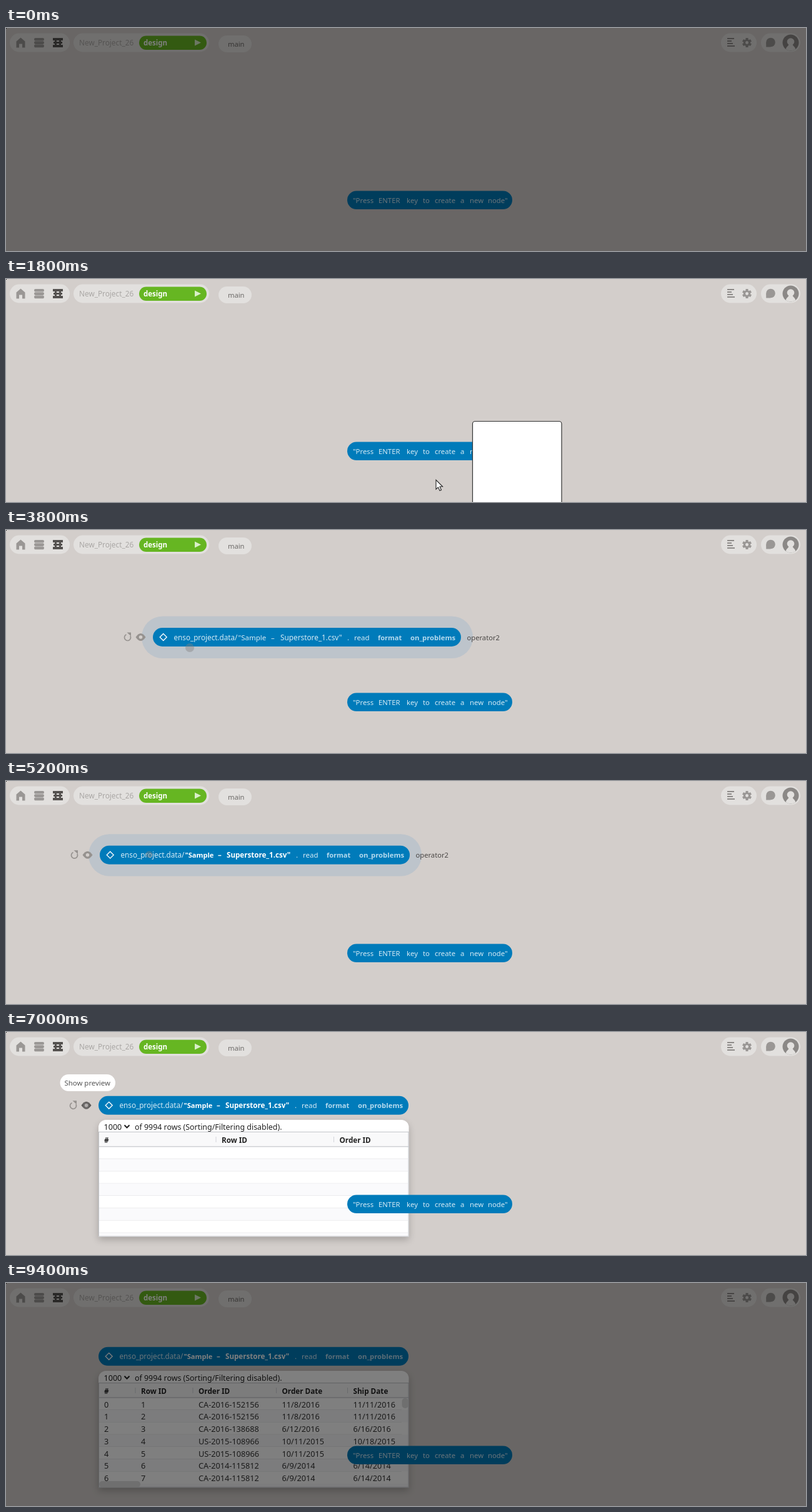
Recreate the animation shown at these times as an HTML page with a canvas. Size 1280 px wide and 358 px high, loop 9.6 s.

```html
<!DOCTYPE html>
<html lang="en">
<head>
<meta charset="utf-8">
<title>Node editor: file drop and preview</title>
<style>
html, body { margin: 0; width: 100%; height: 100%; overflow: hidden; background: #d3cecb; }
canvas { display: block; }
</style>
</head>
<body>
<canvas width="1280" height="358"></canvas>
<script>
const c = document.querySelector('canvas').getContext('2d');
const LOOP = 9600, STEP = 200;
const BG = '#d3cecb', PILL = '#e2e0de', BLUE = '#007bba', GREY = '#9a9795', DARK = '#555250';

// Drawing helpers
function rect(x, y, w, h, fill) {
  c.fillStyle = fill;
  c.fillRect(x, y, w, h);
}
function pill(x, y, w, h, fill, radius = h / 2) {
  c.fillStyle = fill;
  c.beginPath();
  c.roundRect(x, y, w, h, radius);
  c.fill();
}
function disc(x, y, r, fill) {
  c.fillStyle = fill;
  c.beginPath();
  c.arc(x, y, r, 0, 7);
  c.fill();
}
function shape(d, fill, x = 0, y = 0, stroke, width = 1) {
  const path = new Path2D(d);
  c.save();
  c.translate(x, y);
  if (fill) { c.fillStyle = fill; c.fill(path); }
  if (stroke) { c.strokeStyle = stroke; c.lineWidth = width; c.stroke(path); }
  c.restore();
}
function text(s, x, y, fill, size = 11.5, weight = 400, family = '"Noto Sans"') {
  c.font = `${weight} ${size}px ${family}, sans-serif`;
  c.fillStyle = fill;
  c.fillText(s, x, y);
}
function faded(alpha, draw) {
  if (alpha <= 0) return;
  c.save();
  c.globalAlpha = Math.min(1, alpha);
  draw();
  c.restore();
}

// Position along [time, x, y] keys
function track(t, keys) {
  const i = keys.findIndex(k => k[0] > t);
  if (i < 0) return keys[keys.length - 1].slice(1);
  if (i === 0) return keys[0].slice(1);
  const [t0, x0, y0] = keys[i - 1], [t1, x1, y1] = keys[i];
  const p = (t - t0) / (t1 - t0);
  return [x0 + (x1 - x0) * p, y0 + (y1 - y0) * p];
}
const ramp = (t, from, to) => Math.max(0, Math.min(1, (t - from) / (to - from)));

function toolbar() {
  pill(6, 8.5, 96, 30, PILL);
  pill(108, 8.5, 217, 30, PILL);
  pill(340, 12, 53, 27, PILL);
  pill(1144, 8.5, 57, 30, PILL);
  pill(1208, 8.5, 63, 30, PILL);

  shape('M0-8L7-2V8H2.5V2H-2.5V8H-7V-2Z', GREY, 23.5, 23.5);
  for (const y of [16, 21.3, 26.6]) pill(45, y, 16, 4.6, GREY, [4, 4, 5, 5]);
  rect(75, 16, 16, 4, DARK);
  rect(75, 27, 16, 4, DARK);
  rect(78, 20, 3, 7, DARK);
  rect(85, 20, 3, 7, DARK);
  rect(76, 22, 14, 3, DARK);

  text('New_Project_26', 117, 28, '#aaa7a5', 11.8);
  pill(213, 12.5, 108, 22.5, '#66b622');
  text('design', 220, 28, '#fff', 11.5, 700);
  shape('M0-5L10 0L0 5Z', '#d9efc8', 302, 23.5);
  text('main', 355, 29.5, '#6b6866', 11.2, 500);

  [[17, 11], [21, 7], [25, 9], [29, 12]].forEach(([y, w]) => rect(1154, y - 1, w, 1.8, '#858280'));
  for (let i = 0; i < 6; i++) {
    c.save();
    c.translate(1185.5, 23.5);
    c.rotate(i * Math.PI / 3);
    rect(-2, -7.5, 4, 4, GREY);
    c.restore();
  }
  disc(1185.5, 23.5, 5.6, GREY);
  disc(1185.5, 23.5, 2.4, PILL);
  disc(1223.5, 23, 7.3, GREY);
  shape('M-7 0V7.5H0Z', GREY, 1223.2, 23);

  c.save();
  c.beginPath();
  c.arc(1255.5, 23.5, 13, 0, 7);
  c.clip();
  rect(1242, 10, 27, 27, '#8b8886');
  disc(1255.5, 22, 5.8, PILL);
  shape('M-8 9C-7 3-3 3-3 0H3C3 3 7 3 8 9V15H-8Z', PILL, 1255.5, 26);
  c.restore();
}

function hintNode() {
  pill(546, 261.5, 264, 29.5, BLUE);
  [['"Press', 555], ['ENTER', 596], ['key', 641], ['to', 667], ['create', 686],
   ['a', 727], ['new', 742], ['node"', 771]]
    .forEach(([word, x]) => text(word, x, 280.5, '#d5eaf5', 11.3));
}

function sideIcons(x, y, eye) {
  c.strokeStyle = '#96928f';
  c.lineWidth = 1.7;
  c.beginPath();
  c.arc(x, y + .5, 5, -.5, 4.3);
  c.stroke();
  shape('M-1-7.5H5.5V-1.5Z', '#96928f', x, y);
  shape('M-8 0Q0-12 8 0Q0 12-8 0Z', eye, x + 21, y);
  disc(x + 21, y, 2.8, BG);
}

function readNode(t, x, y) {
  const bold = t >= 4400, width = bold ? 496 : 493, mid = y + 15;
  const hover = ramp(t, 2800, 3400) * (1 - ramp(t, 5200, 5800));
  faded(hover, () => {
    pill(x - 18, y - 18.5, width + 37, 67.5, '#bdc4cb', 33.5);
    text('operator2', x + width + 9.5, y + 19.5, '#4b4846', 11.2);
  });
  if (t >= 3000 && t < 7200) sideIcons(x - 40.5, mid, t < 6200 ? '#96928f' : '#5a5755');

  pill(x, y, width, 30, BLUE);
  shape('M0-5.5L5.5 0L0 5.5L-5.5 0Z', null, x + 16.7, mid, '#fff', 1.3);
  const base = y + 19.5, soft = '#d5eaf5', weight = bold ? 700 : 400;
  const literal = bold ? '#fff' : soft, shift = bold ? 0 : 3;
  text('enso_project.data/', x + 33.5, base, soft, 11.7);
  text('"Sample', x + 136.5, base, literal, bold ? 11.1 : 11.5, weight);
  text('–', x + 189, base, literal, 11.5, weight);
  text('Superstore_1.csv"', x + (bold ? 203 : 204), base, literal, bold ? 11.6 : 11.8, weight);
  text('.', x + 314 - shift, base, soft);
  text('read', x + 325 - shift, base, soft);
  text('format', x + 363 - shift, base, '#b5daee', 11, 700);
  text('on_problems', x + 415 - shift, base, '#b5daee', 11.3, 700);
}

const WIDE = [['#', 157], ['Row ID', 345], ['Order ID', 533.5]];
const FITTED = [['#', 157], ['Row ID', 216], ['Order ID', 308], ['Order Date', 441.5], ['Ship Date', 555.5]];
const ORDERS = [
  ['CA-2016-152156', '11/8/2016', '11/11/2016'],
  ['CA-2016-152156', '11/8/2016', '11/11/2016'],
  ['CA-2016-138688', '6/12/2016', '6/16/2016'],
  ['US-2015-108966', '10/11/2015', '10/18/2015'],
  ['US-2015-108966', '10/11/2015', '10/18/2015'],
  ['CA-2014-115812', '6/9/2014', '6/14/2014'],
  ['CA-2014-115812', '6/9/2014', '6/14/2014'],
];

function preview(t) {
  const loaded = t >= 7800, columns = loaded ? FITTED : WIDE, rowHeight = 19.75;
  c.save();
  c.shadowColor = 'rgba(0,0,0,.22)';
  c.shadowBlur = 12;
  c.shadowOffsetY = 5;
  pill(148, 141, 496.5, 187.5, '#fff', [12, 12, 0, 0]);
  c.restore();
  if (t < 7000) return;

  text('1000', 156.5, 156.5, '#222', 12.6);
  shape('M0 0L4 4L8 0', null, 189.5, 149.5, '#222', 2);
  text('of 9994 rows (Sorting/Filtering disabled).', 206, 156.5, '#222', 12.4);
  rect(148.5, 161, 495.5, 23, '#f9f9fa');
  for (let i = 0; i < 8; i++) {
    const y = 184 + i * rowHeight, end = loaded ? 633 : 643;
    rect(149, y, 494, Math.min(rowHeight, 328 - y), i % 2 ? '#fafafc' : '#fff');
    if (i < 7 && !(loaded && i === 6)) rect(149, y + rowHeight - .5, end - 149, 1, '#dedfe2');
  }
  rect(148, 160, 496.5, 1, '#b9bcc2');
  rect(148, 183.5, 496.5, 1, '#b9bcc2');
  c.strokeStyle = '#c3c5ca';
  c.lineWidth = 1;
  c.strokeRect(148.5, 160.5, 495.5, 167.5);

  columns.forEach(([name, x], i) => {
    text(name, x, 177.7, '#222', 11.7, 700);
    if (i) rect(x - 9.5, 168, 1, 9, '#d3d5d9');
  });
  if (!loaded) return;
  ORDERS.forEach((order, i) => {
    [i, i + 1, ...order].forEach((value, col) =>
      text(value, columns[col][1], 199.5 + i * rowHeight, '#333', 12.7));
  });
  pill(633.5, 185, 10.5, 16, '#dfdfe0', 5);
  pill(149, 318, 66, 10, '#dfdfe0', 5);
}

function tooltip() {
  pill(86.5, 68, 88.5, 27, '#fff');
  text('Show preview', 93.5, 86, '#555', 11.4);
}

function draggedFile(t) {
  const [x, y] = track(t, [[1800, 746.5, 228.5], [2400, 220.5, 70.5], [2600, 144.5, 46.5]]);
  pill(x, y, 142.5, 165, '#fff', 4);
  c.strokeStyle = '#333';
  c.lineWidth = 1.2;
  c.stroke();
  const [px, py] = track(t, [[1800, 688, 322.5], [2600, 216, 171]]);
  shape('M0 0V15L3.5 11.8L6 17.3L8.5 16.2L6.1 10.8H10.6Z', '#fff', px, py, '#222', 1.1);
}

function pointer(t) {
  const [x, y] = track(t, [
    [2800, 222, 176], [3800, 294, 189], [4200, 314, 171], [5000, 229, 118], [5200, 229, 118],
    [6200, 128, 118], [7000, 128, 118], [7600, 798, 250], [8400, 863, 121],
  ]);
  disc(x, y, t < 4200 ? 7 : 5.5, 'rgba(130,128,128,.42)');
}

function draw(t) {
  rect(0, 0, 1280, 358, BG);
  toolbar();
  rect(0, 0, 1, 1, '#000');
  if (t >= 2800) {
    const [x, y] = track(t, [[4200, 235, 157], [5000, 150, 103.7], [5200, 150, 103.7], [5400, 148, 102.8]]);
    if (t >= 6800) preview(t);
    readNode(t, x, y);
  }
  hintNode();
  if (t >= 6200 && t < 7400) tooltip();
  if (t >= 1800 && t < 2800) draggedFile(t);
  if (t >= 2800 && t < 8600) pointer(t);

  const shade = t >= 9400 ? .5 : .5 * (1 - ramp(t, 0, 600));
  rect(0, 0, 1280, 358, `rgba(0,0,0,${shade})`);
}

const start = performance.now();
function tick() {
  const t = (performance.now() - start) % LOOP;
  draw(Math.floor(t / STEP) * STEP);
  requestAnimationFrame(tick);
}
tick();
</script>
</body>
</html>
```
